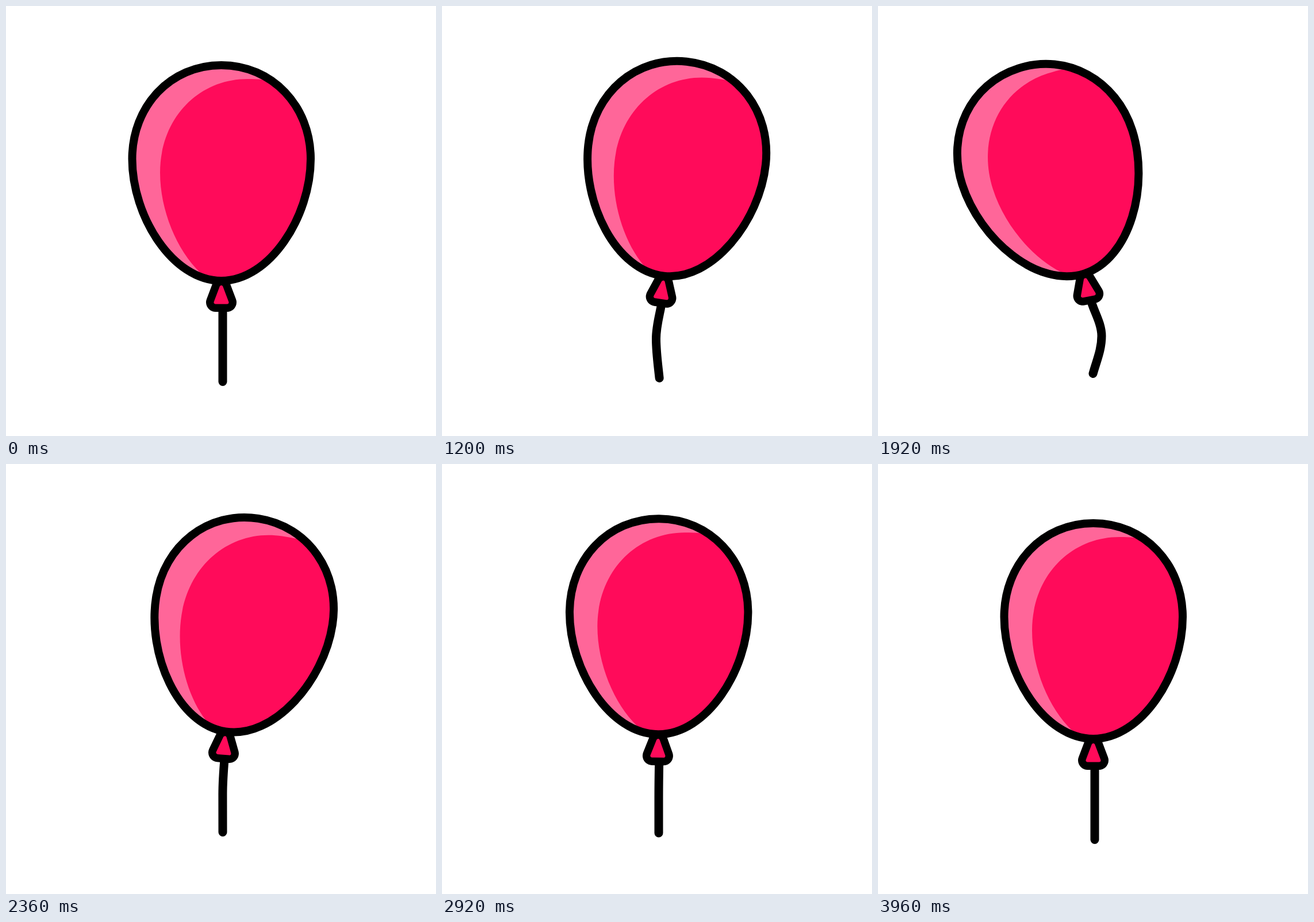
Recreate the animation shown at these times as an HTML page. Size 748x748 px, loop 4000 ms.

```html
<!DOCTYPE html>
<html lang="en">
<head>
<meta charset="utf-8">
<title>Balloon</title>
<style>
  html, body { margin: 0; width: 100%; height: 100%; overflow: hidden; background: #fff; }
  svg { display: block; width: 100%; height: 100%; }
</style>
</head>
<body>
<svg viewBox="0 0 748 748">
  <defs>
    <path id="egg" d="M374.5 103C463 103 530 174 530 266C530 366 459 478 374.5 478C290 478 219.5 366 219.5 266C219.5 174 286 103 374.5 103Z"/>
    <path id="knot" d="M374.5 489L364.5 515.5H384.5Z" stroke-linejoin="round"/>
    <clipPath id="inside"><use href="#egg"/></clipPath>
  </defs>
  <g id="float">
    <path id="string" fill="none" stroke="#000" stroke-width="15" stroke-linecap="round"/>
    <g id="base">
      <use href="#knot" stroke="#000" stroke-width="33"/>
      <use href="#knot" fill="#ff0b5a" stroke="#ff0b5a" stroke-width="6"/>
      <g id="body">
        <use href="#egg" fill="#ff6699"/>
        <path clip-path="url(#inside)" fill="#ff0b5a" d="M475 132C455 128 438 127 420 127C335 127 268 195 268 290C268 355 297 425 338 464L350 490H560V132Z"/>
        <use href="#egg" fill="none" stroke="#000" stroke-width="14"/>
      </g>
    </g>
  </g>
</svg>
<script>
const LOOP = 4000, STEP = 40;
const PIVOT = { x: 374.5, y: 562 }, NECK = { x: 374.5, y: 480 };

// Turning points of the swing: [time in ms, degrees].
const SWING = [[560, 0], [1045, -8.4], [1405, 28.4], [1825, -22.7], [2220, 14.1], [2655, -8.6], [3095, 4.8], [3540, 0]];

const $ = id => document.getElementById(id);

// Sine easing from 0 at t0 to 1 at t1.
function ease(t, t0, t1) {
  const p = Math.min(1, Math.max(0, (t - t0) / (t1 - t0)));
  return (1 - Math.cos(Math.PI * p)) / 2;
}

function tilt(t) {
  return SWING.slice(1).reduce((sum, [t1, v1], i) => {
    const [t0, v0] = SWING[i];
    return sum + (v1 - v0) * ease(t, t0, t1);
  }, 0);
}

function turn(x, y, deg) {
  const a = deg * Math.PI / 180, dx = x - PIVOT.x, dy = y - PIVOT.y;
  return {
    x: PIVOT.x + dx * Math.cos(a) - dy * Math.sin(a),
    y: PIVOT.y + dx * Math.sin(a) + dy * Math.cos(a)
  };
}

// The string bows against the swing, then settles straight.
function stringPath(t, angle) {
  const bow = -0.75 * tilt(t) * (1 - ease(t, 1800, 2400));
  const top = turn(377, 522, angle), lead = turn(377, 542, angle);
  const midX = 377 + bow, midY = 588;
  const endX = 377 - 0.25 * bow;
  const endY = 653.5 + 3.8 * Math.sin(2 * Math.PI * t / LOOP) ** 5;
  return `M${top.x} ${top.y}C${lead.x} ${lead.y} ${midX} ${midY - 24} ${midX} ${midY}` +
    `C${midX} ${midY + 24} ${endX + (midX - endX) * 0.4} ${endY - 22} ${endX} ${endY}`;
}

function draw(t) {
  const bodyAngle = tilt(t);
  // The knot leads the balloon and swings less.
  const baseAngle = 0.75 * tilt(t + 30);
  const lift = -7 * (1 - Math.cos(2 * Math.PI * t / LOOP));
  $('float').setAttribute('transform', `translate(0 ${lift})`);
  $('base').setAttribute('transform', `rotate(${baseAngle} ${PIVOT.x} ${PIVOT.y})`);
  $('body').setAttribute('transform', `rotate(${bodyAngle - baseAngle} ${NECK.x} ${NECK.y})`);
  $('string').setAttribute('d', stringPath(t, baseAngle));
}

const start = performance.now();
function tick() {
  const t = (performance.now() - start) % LOOP;
  draw(Math.floor(t / STEP) * STEP);
  requestAnimationFrame(tick);
}
tick();
</script>
</body>
</html>
```
